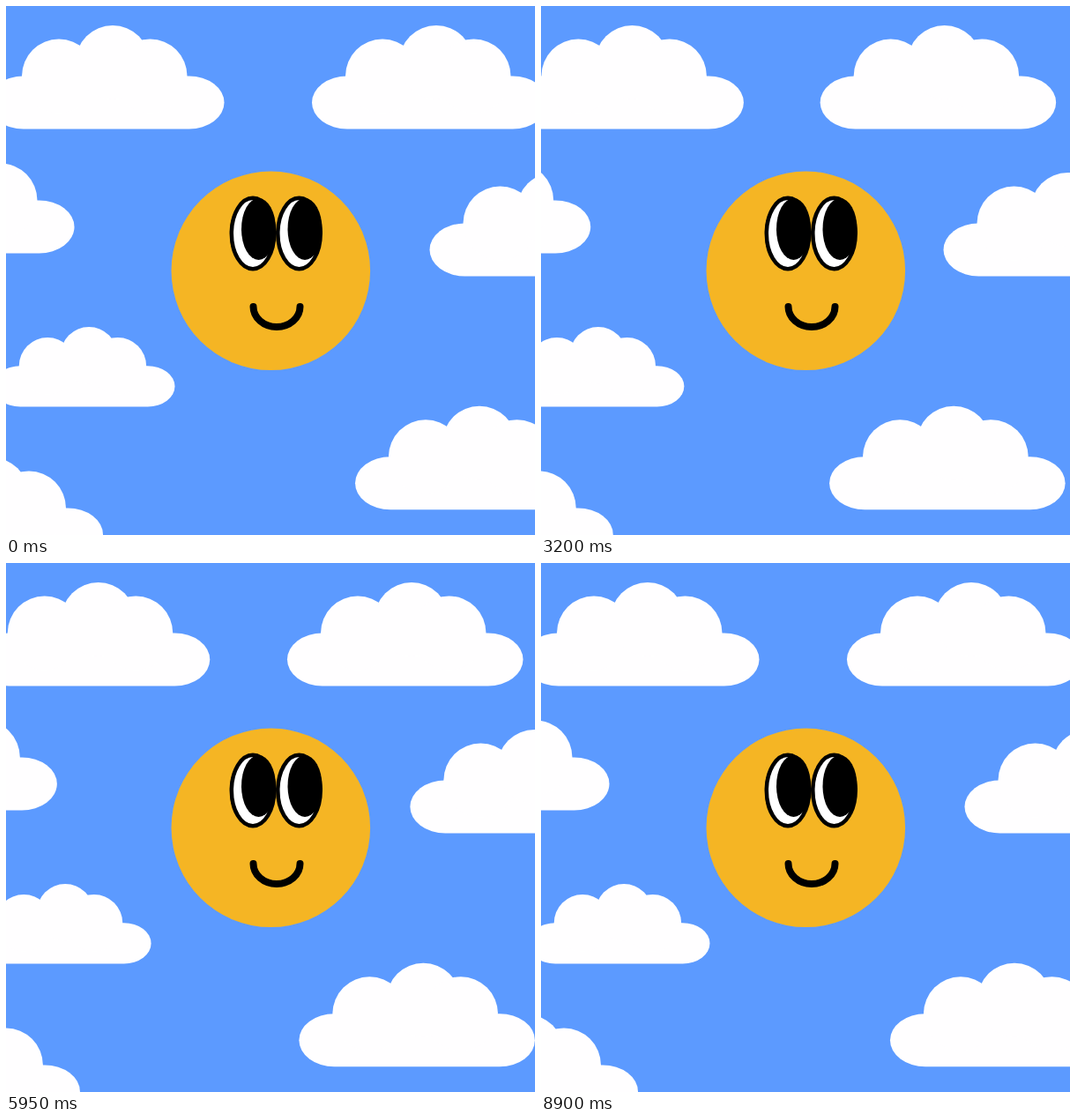
An HTML page for the animation above (8.95 s loop, 600x600 px).

```html
<!DOCTYPE html>
<html lang="en">
<head>
<meta charset="utf-8">
<title>Sunny sky</title>
<style>
  html, body { margin: 0; width: 100%; height: 100%; overflow: hidden; background: #5c9aff; }
  svg { display: block; width: 100%; height: 100%; }
</style>
</head>
<body>
<svg viewBox="0 0 600 600">
  <defs>
    <g id="cloud" fill="#fffeff">
      <rect y="57.5" width="267.5" height="60" rx="40" ry="30"/>
      <circle cx="80" cy="57.5" r="42"/>
      <circle cx="141" cy="42" r="42"/>
      <circle cx="183.5" cy="57.5" r="42"/>
    </g>
    <g id="eye">
      <ellipse cx="280" cy="258" rx="24.2" ry="40.2" fill="#fff"/>
      <ellipse cx="286.5" cy="253" rx="19.5" ry="35"/>
      <ellipse cx="280" cy="258" rx="24.2" ry="40.2" fill="none" stroke="#000" stroke-width="4.5"/>
    </g>
  </defs>
  <rect width="600" height="600" fill="#5c9aff"/>
  <g id="sky"></g>
  <circle cx="300.3" cy="300.3" r="112.8" fill="#f5b524"/>
  <use href="#eye"/>
  <use href="#eye" x="52.5"/>
  <path d="M280.5 341A26.5 23 0 0 0 333.5 341" fill="none" stroke="#000" stroke-width="8" stroke-linecap="round"/>
</svg>
<script>
const LOOP = 8950, STEP = 50, START = 30, TURN = 4410;

const clouds = [
  { x: -20, y: 22, drift: 20.2 },
  { x: 347, y: 22, drift: 34.8 },
  { x: -190, y: 163, drift: 24.4 },
  { x: 480.5, y: 189, drift: 27.5 },
  { x: -14.5, y: 364, drift: 33.4, scale: 0.77 },
  { x: 396, y: 453.7, drift: 79 },
  { x: -157.5, y: 512, drift: 32.4 }
];

const sky = document.getElementById("sky");
for (const cloud of clouds) {
  cloud.node = document.createElementNS("http://www.w3.org/2000/svg", "use");
  cloud.node.setAttribute("href", "#cloud");
  sky.append(cloud.node);
}

// Cubic Bezier easing with flat ends, solved by bisection
function ease(p) {
  let low = 0, high = 1, s = 0.5;
  for (let i = 0; i < 24; i++) {
    s = (low + high) / 2;
    const r = 1 - s;
    const x = 3 * r * r * s * 0.34 + 3 * r * s * s * 0.535 + s ** 3;
    if (x < p) low = s; else high = s;
  }
  return s * s * (3 - 2 * s);
}

function render(time) {
  const t = Math.floor((time % LOOP) / STEP) * STEP;
  const p = t < TURN ? (t - START) / (TURN - START) : (LOOP - t) / (LOOP - TURN);
  const amount = ease(Math.max(0, p));
  for (const { node, x, y, drift, scale = 1 } of clouds) {
    node.setAttribute("transform", `translate(${x - drift * amount} ${y}) scale(${scale})`);
  }
}

const begin = performance.now();
function tick() {
  render(performance.now() - begin);
  requestAnimationFrame(tick);
}
tick();
</script>
</body>
</html>
```
